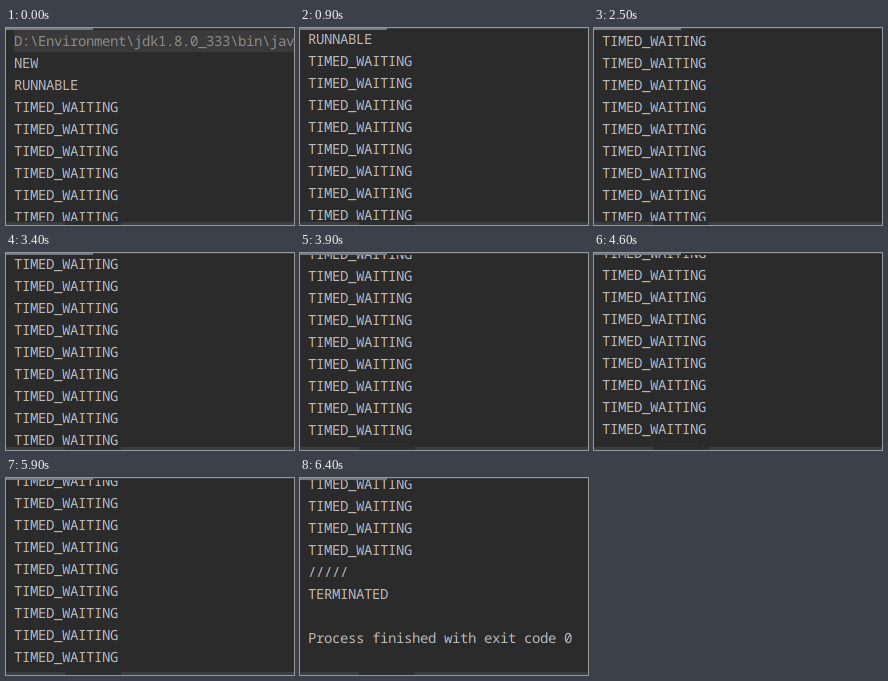
These frames come from a looping animation (288 by 197 pixels, 7400 ms). An HTML page with a canvas:

```html
<!DOCTYPE html>
<html lang="en">
<head>
<meta charset="utf-8">
<title>Console scroll</title>
<style>
  html, body { margin: 0; width: 100%; height: 100%; overflow: hidden; background: #2b2b2b; }
  canvas { display: block; width: 288px; height: 197px; }
</style>
</head>
<body>
<canvas id="stage" width="288" height="197"></canvas>
<script>
const ctx = document.getElementById('stage').getContext('2d');
const W = 288, H = 197, LOOP = 7400, STEP = 100;
const LINE = 22, NOTCH = 3 * LINE, TOP = 2, BOTTOM = 193, LEFT = 8;

const lines = [
  'D:\\Environment\\jdk1.8.0_333\\bin\\java.exe', 'NEW', 'RUNNABLE',
  ...Array(43).fill('TIMED_WAITING'),
  '/////', 'TERMINATED', '', 'Process finished with exit code 0'
];
const MAX_SCROLL = (lines.length + 1) * LINE - (BOTTOM - TOP);

// Wheel gestures: start time, visible steps, notches turned.
const gestures = [
  [900, 3, 1], [1300, 2, 1], [1700, 3, 1], [2400, 2, 1], [3000, 2, 1],
  [3400, 3, 1], [3800, 6, 2], [4600, 5, 2], [5200, 3, 1], [5700, 8, 4]
];

// A single notch settles quickly; longer turns run almost evenly.
function scrollAt(t) {
  let y = 0;
  for (const [start, steps, notches] of gestures) {
    if (t < start) break;
    const p = Math.min(1, (Math.floor((t - start) / STEP) + 1) / steps);
    const end = Math.min(MAX_SCROLL, y + notches * NOTCH);
    const power = notches > 1 ? 1.375 : 3;
    y += (end - y) * (1 - (1 - p) ** power);
  }
  return Math.round(y);
}

function rect(color, x, y, w, h) {
  ctx.fillStyle = color;
  ctx.fillRect(x, y, w, h);
}

// Adds light per colour channel, a third of a pixel apart, like LCD text.
function lcdText(text, y, light) {
  ctx.globalCompositeOperation = 'lighter';
  [0, 1, 2].forEach(c => {
    const rgb = [0, 0, 0];
    rgb[c] = light;
    ctx.fillStyle = `rgb(${rgb})`;
    ctx.fillText(text, LEFT + (1 - c) / 3, y);
  });
  ctx.globalCompositeOperation = 'source-over';
}

function draw(t) {
  const scroll = scrollAt(t);
  rect('#2b2b2b', 0, 0, W, H);

  ctx.save();
  ctx.beginPath();
  ctx.rect(0, TOP, W, BOTTOM - TOP);
  ctx.clip();
  rect('#3a3a3a', LEFT, TOP - scroll, W - LEFT, LINE);
  ctx.font = '500 14px "Noto Sans Mono", "DejaVu Sans Mono", monospace';
  ctx.letterSpacing = '-0.4px';
  ctx.textRendering = 'geometricPrecision';
  lines.forEach((text, i) => {
    const y = 18 + i * LINE - scroll;
    if (y > -LINE && y < H + LINE) lcdText(text, y, i ? 144 : 82);
  });
  ctx.restore();

  rect('#3c3f41', 0, 0, W, 1);
  rect('#747a80', 0, 0, 87, 2);
  rect('#3c3f41', 0, 194, W, 3);
  rect('#2d2f30', 59, 194, 56, 3);
}

function frame(now) {
  draw(now % LOOP);
  requestAnimationFrame(frame);
}
draw(0);
requestAnimationFrame(frame);
</script>
</body>
</html>
```
